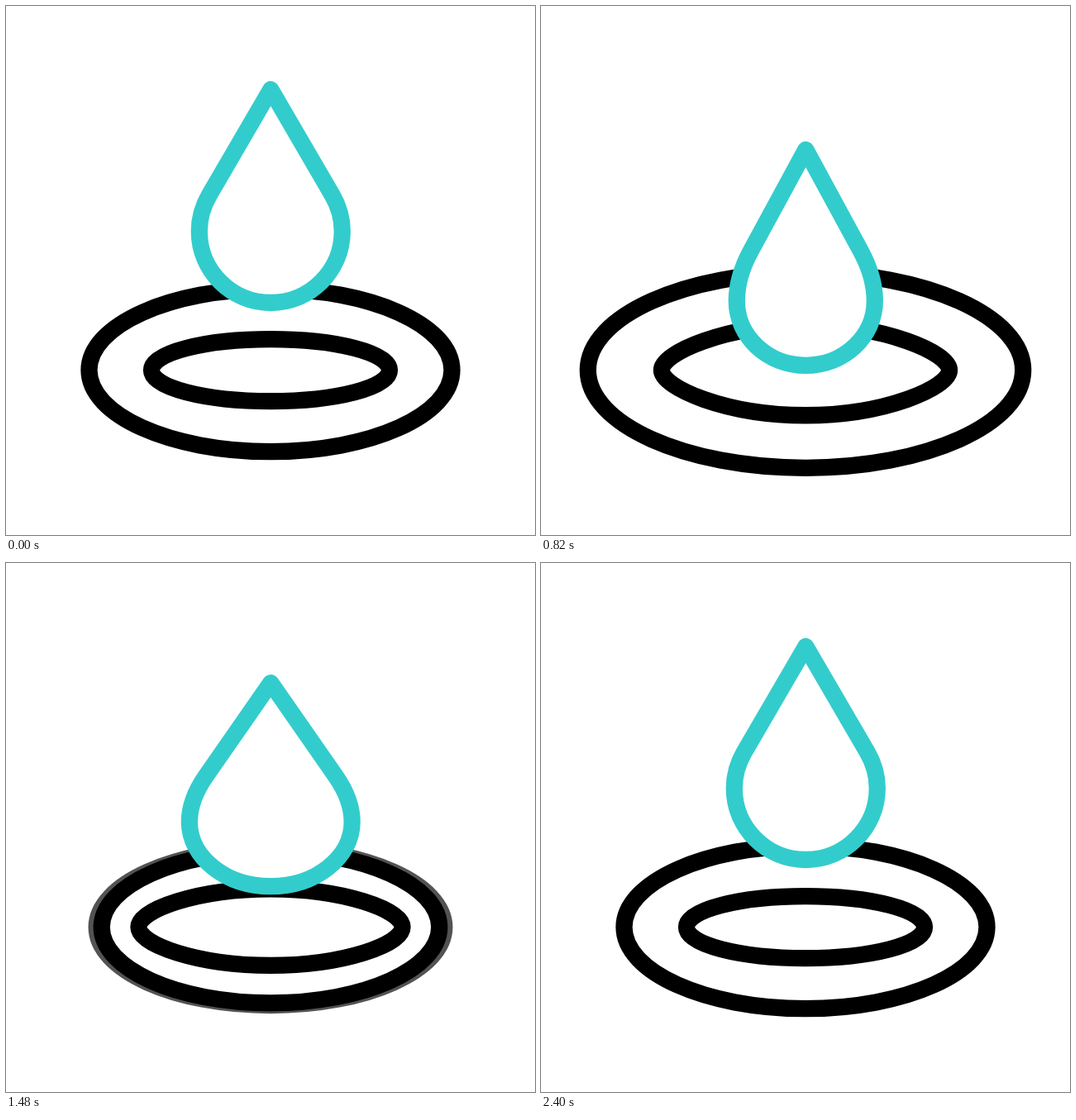
Recreate the animation shown at these times as an HTML page with a canvas. Size 640 px wide and 640 px high, loop 3 s.

```html
<!DOCTYPE html>
<html lang="en">
<head>
<meta charset="utf-8">
<title>Water drop</title>
<style>
  html, body { margin: 0; width: 100%; height: 100%; overflow: hidden; background: #fff; }
  canvas { display: block; width: 640px; height: 640px; }
</style>
</head>
<body>
<canvas id="stage" width="640" height="640"></canvas>
<script>
const ctx = document.getElementById('stage').getContext('2d');
const LOOP = 3000, START = 220, END = 2400;
const CX = 320, CY = 440.6, FLATTEN = .449, ROUND = .5523;

const mix = (a, b, p) => a + (b - a) * p;
const ease = (t, from, to) => {
  const p = Math.min(Math.max((t - from) / (to - from), 0), 1);
  return (1 - Math.cos(Math.PI * p)) / 2;
};

// Swings from rest through [time, value] turning points and back to rest
function swing(t, rest, ...turns) {
  let value = rest, since = START;
  for (const [time, next] of [...turns, [END, rest]]) {
    value = mix(value, next, ease(t, since, time));
    since = time;
  }
  return value;
}

function ring(rx, ry, alpha = 1, handle = ry * ROUND) {
  const hx = rx * ROUND;
  ctx.beginPath();
  ctx.moveTo(CX - rx, CY);
  ctx.bezierCurveTo(CX - rx, CY - handle, CX - hx, CY - ry, CX, CY - ry);
  ctx.bezierCurveTo(CX + hx, CY - ry, CX + rx, CY - handle, CX + rx, CY);
  ctx.bezierCurveTo(CX + rx, CY + handle, CX + hx, CY + ry, CX, CY + ry);
  ctx.bezierCurveTo(CX - hx, CY + ry, CX - rx, CY + handle, CX - rx, CY);
  ctx.closePath();
  ctx.strokeStyle = `rgba(0, 0, 0, ${alpha})`;
  ctx.stroke();
}

// A ring that spreads and fades, then is gone
function wave(t, [from, to], [r0, r1], [a0, a1]) {
  if (t <= from || t >= to) return;
  const p = ease(t, from, to), r = mix(r0, r1, p);
  ring(r, r * FLATTEN, mix(a0, a1, p));
}

function drop(tip, squash, moving) {
  const x = CX + .3, w = 86.5 + squash;
  const bottom = tip + 258 - squash;
  const wide = bottom - mix(86.5, 78, moving);
  const h = wide - tip;
  const slope = mix(1.154, 1.19, moving) * w / h;
  const sy = h * mix(.746, .67, moving), sx = sy * slope;
  const corner = w / slope; // where the straight side would reach full width
  const cx = mix(sx, w, .655), cy = tip + mix(sy, corner, .655);
  const high = mix(wide, tip + corner, .655), low = mix(wide, bottom, ROUND);
  ctx.beginPath();
  ctx.moveTo(x, tip);
  ctx.lineTo(x - sx, tip + sy);
  ctx.bezierCurveTo(x - cx, cy, x - w, high, x - w, wide);
  ctx.bezierCurveTo(x - w, low, x - w * ROUND, bottom, x, bottom);
  ctx.bezierCurveTo(x + w * ROUND, bottom, x + w, low, x + w, wide);
  ctx.bezierCurveTo(x + w, high, x + cx, cy, x + sx, tip + sy);
  ctx.closePath();
  ctx.fillStyle = '#fff';
  ctx.fill();
  ctx.strokeStyle = '#33cccc';
  ctx.stroke();
}

function draw(now) {
  const t = now % LOOP;
  ctx.fillStyle = '#fff';
  ctx.fillRect(0, 0, 640, 640);
  ctx.lineWidth = 20.3;
  ctx.lineJoin = 'round';

  wave(t, [220, 765], [219.5, 308], [1, 0]);
  wave(t, [1380, 1940], [203, 297], [.72, .12]);

  const outer = swing(t, 219.5, [760, 264.5], [1420, 203], [1880, 233]);
  ring(outer, outer * FLATTEN);

  const inner = swing(t, 144, [640, 183], [1210, 144], [1740, 174], [2180, 144]);
  ring(inner, 37.5 + (inner - 144) * .57, 1, 21);

  const tip = swing(t, 101, [772, 175], [1275, 126.5], [1760, 175]);
  const squash = swing(t, 0, [840, -3], [1410, 12.5], [1980, -3.5]);
  const moving = swing(t, 0, [600, 1], [2050, 1]);
  drop(tip, squash, moving);
  requestAnimationFrame(draw);
}
requestAnimationFrame(draw);
</script>
</body>
</html>
```
